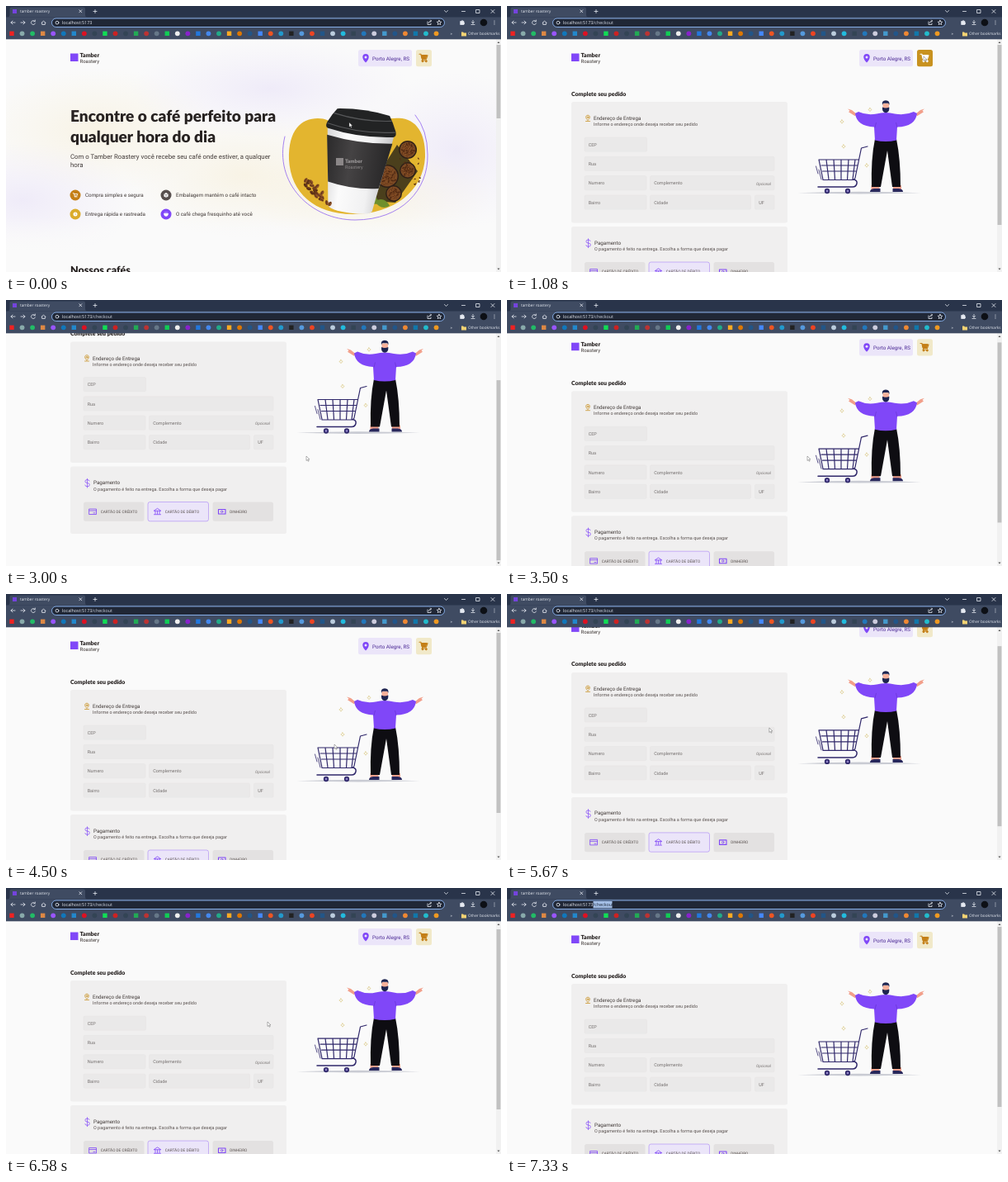
These frames come from a looping animation (600x322 px, 8000 ms). An HTML page:

```html
<!DOCTYPE html>
<html lang="pt-BR">
<head>
<meta charset="utf-8">
<title>tamber roastery</title>
<style>
html, body { margin: 0; width: 100%; height: 100%; overflow: hidden; background: #fafafa; }
svg { display: block; width: 100%; height: 100%; }
text { font-family: Roboto, sans-serif; font-size: 6.25px; fill: #403937; text-rendering: geometricPrecision; }
.title { font-family: Lato, sans-serif; font-weight: 900; fill: #272221; }
.hero { font-size: 19.1px; }
.lead { font-size: 7.8px; }
.ui { font-family: "Open Sans", sans-serif; font-size: 4.8px; fill: #e6eaf1; }
.small { font-size: 5.47px; fill: #574f4d; }
.hint { font-size: 5.47px; fill: #75706f; }
.opt { font-size: 4.69px; fill: #574f4d; }
.line { fill: none; stroke-linecap: round; stroke-linejoin: round; }
</style>
</head>
<body>
<svg viewBox="0 0 600 322">
  <defs>
    <clipPath id="view"><rect y="40" width="600" height="282"/></clipPath>
    <radialGradient id="cream"><stop stop-color="#f6ecd0" stop-opacity=".5"/><stop offset="1" stop-color="#f6eed6" stop-opacity="0"/></radialGradient>
    <radialGradient id="lilac"><stop stop-color="#e6dff7" stop-opacity=".55"/><stop offset="1" stop-color="#ece6fa" stop-opacity="0"/></radialGradient>
    <linearGradient id="paper"><stop stop-color="#d5d5d7"/><stop offset=".3" stop-color="#fbfbfb"/><stop offset=".7" stop-color="#f1f1f2"/><stop offset="1" stop-color="#c4c4c6"/></linearGradient>
    <linearGradient id="sleeve"><stop stop-color="#2b2a2b"/><stop offset=".4" stop-color="#454344"/><stop offset="1" stop-color="#272627"/></linearGradient>
    <linearGradient id="fade" x2="0" y2="1"><stop stop-color="#fafafa" stop-opacity="0"/><stop offset="1" stop-color="#fafafa"/></linearGradient>
    <path id="trolley" class="line" d="M-5 -4.2h2l1.6 6h4.8l1.6 -4.5h-7.2M-1.2 2l-.6 1.5h5.6"/>
  </defs>

  <g clip-path="url(#view)">
    <rect y="40" width="600" height="282" fill="#fafafa"/>
    <g id="page">
      <g id="home">
        <g id="glow"></g>
        <rect y="255" width="600" height="44" fill="url(#fade)"/>
        <rect y="298" width="600" height="24" fill="#fafafa"/>
        <text class="title hero" x="78" y="140.400">Encontre o café perfeito para</text>
        <text class="title hero" x="78" y="165">qualquer hora do dia</text>
        <text class="title" style="font-size:12.500px" x="78" y="324">Nossos cafés</text>
        <text class="lead" x="78" y="185">Com o Tamber Roastery você recebe seu café onde estiver, a qualquer</text>
        <text class="lead" x="78" y="194.500">hora</text>
        <g id="perks"></g>
        <path class="line" d="M338 158C324 215 370 259 423 259C480 259 512 222 511 180Q511 150 496 132" stroke="#8f63f0" stroke-width=".8"/>
        <path d="M343 186C342 150 358 136 378 136C396 136 402 150 422 150C446 150 452 133 480 136C501 139 509 160 508 183C506 224 470 252 420 252C374 252 345 226 343 186Z" fill="#e3b52f"/>
        <path d="M450 206L474 168L499 200L472 238L442 236Z" fill="#4b3f1c"/>
        <path d="M438 226q10 -1 14 13q-14 4 -14 -13M447 236q12 -6 18 6q-11 6 -18 -6" fill="#6f8f2c"/>
        <g id="bowls"></g>
        <g id="cup" transform="translate(425 188) rotate(8)">
          <path d="M-41 -38H41L27 57Q25 63 0 63Q-25 63 -27 57Z" fill="url(#paper)"/>
          <path d="M-40 -27Q0 -21 40 -27L31 29Q0 35 -31 29Z" fill="url(#sleeve)"/>
          <path d="M-37 -52L-32 -60Q0 -65 32 -60L37 -52L42 -42Q44 -36 40 -35Q0 -28 -40 -35Q-44 -36 -42 -42Z" fill="#222324"/>
          <path class="line" d="M-35 -54Q0 -48 35 -54M-41 -41Q0 -33 41 -41" stroke="#565759" stroke-width="1.200"/>
        </g>
        <rect x="400" y="184" width="9" height="9" fill="#8b8788"/>
        <text class="title" style="font-size:6.200px;fill:#9a9798" x="411" y="190">Tamber</text>
        <text style="font-size:5.500px;fill:#8b8788" x="411" y="197">Roastery</text>
        <g id="beans"></g>
      </g>

      <g id="checkout">
        <text class="title" style="font-size:7px" x="78" y="108.500">Complete seu pedido</text>
        <g fill="#f0efef">
          <rect x="78" y="116" width="262" height="146.500" rx="2.500"/>
          <rect x="78" y="267" width="262" height="81.500" rx="2.500"/>
        </g>
        <g class="line" stroke="#c9952b" stroke-width=".8">
          <path d="M98 138.500c-3 -2.500 -3.300 -6 0 -6.300c3.300 .3 3 3.800 0 6.300M95.500 139.500h5"/><circle cx="98" cy="134.800" r="1"/>
        </g>
        <text x="105" y="138">Endereço de Entrega</text>
        <text class="small" x="105" y="145">Informe o endereço onde deseja receber seu pedido</text>
        <g id="fields"></g>
        <text class="hint" style="font-size:4.690px;font-style:italic" x="302" y="216.500">Opcional</text>
        <path class="line" d="M101 284.500q-.3 -1.500 -2.500 -1.500q-2.600 0 -2.600 2t2.600 2q2.800 0 2.800 2.200t-2.800 2.100q-2.500 0 -2.700 -1.800M98.500 281.800v10.800" stroke="#8047f8" stroke-width=".7"/>
        <text x="106" y="288.500">Pagamento</text>
        <text class="small" x="106" y="296">O pagamento é feito na entrega. Escolha a forma que deseja pagar</text>
        <g id="options"></g>
        <g class="line" stroke="#8047f8" stroke-width=".8">
          <path d="M101 318.500h8.500v6.500h-8.500zM101 320.500h8.500M106 323.300h2"/>
          <path d="M179.500 320.500l4 -2.700l4 2.700zM181 321v3.500M183.500 321v3.500M186 321v3.500M179.500 325.200h8"/>
          <path d="M257.500 319h8.500v5.500h-8.500z" stroke-width="1.100"/><circle cx="261.700" cy="321.700" r="1.200"/>
        </g>

        <g id="shopper">
          <path d="M352 226.300Q427 223 502 226.300Q427 228.500 352 226.300Z" fill="#c9cbd3"/>
          <g class="line" stroke="#dccb8a" stroke-width=".7" id="sparks"></g>
          <path d="M441.500 217h10v6h-10zM468 217h10v6h-10z" fill="#f0a08c"/>
          <path d="M440 225q0 -3.500 5 -4h7.500v4zM480 225q0 -3.500 -5 -4h-7.500v4z" fill="#28285c"/>
          <path d="M446 161h26q5 24 5 58h-10l-6 -44l-8 44h-11q-1 -34 4 -58" fill="#0e0d12"/>
          <path d="M424 131l-6 -5l-5 -1.500l2.500 2.300l-1.500 1.500l8 5zM495 131l6 -5l5 -1.500l-2.500 2.300l1.500 1.500l-8 5z" fill="#f29f8a"/>
          <path d="M422 130l4 -2q11 5 22 2.500q11 -3 22 0q12 2.500 23 -2.500l4 2q-2 16 -24 16.500l-1 16q-13 3 -26 0l-1 -16q-21 -1 -23 -16.500" fill="#8047f8"/>
          <path d="M446 147l1.500 -6M473 147l-1.500 -6" stroke="#6330cc" stroke-width=".6"/>
          <path d="M455.500 118h7.500v8h-7.500z" fill="#f7b19a"/>
          <path d="M455 120q-1.200 -5.500 4 -5.700q5.500 .2 4.300 5.700l-1 -2.200h-6.300zM455 122.500q4 2 8.300 0v2q0 4 -4.200 4.700q-4.100 -.7 -4.100 -4.700z" fill="#1d2450"/>
          <g class="line" stroke="#30286b">
            <path d="M437 170l-7.500 2l-7.500 36q-.5 2.500 -3 2.500h-36M378 186h48M378 186l5 24M381 193h44M382.500 200h40.500M387 186l3 24M396 186l1.500 24M405 186v24M414 186l-1.500 24M422 186l-3 24" stroke-width="1.200"/>
            <path d="M420 210q5 1 4 5t-5 4h-42" stroke-width="1.500"/>
            <path d="M374.500 194l2.500 9M378 198l3 12" stroke-width=".8"/>
          </g>
          <g fill="#8c80c4" stroke="#30286b" stroke-width="1.700"><circle cx="388" cy="224" r="2.300"/><circle cx="413" cy="224" r="2.300"/></g>
        </g>
      </g>

      <rect x="78" y="57.500" width="9.500" height="9.500" fill="#8047f8"/>
      <text class="title" style="font-size:7px" x="89.500" y="61.800">Tamber</text>
      <text style="font-size:6px" x="89.500" y="69.300">Roastery</text>
      <rect x="427" y="53" width="65" height="20.300" rx="2.500" fill="#ebe5f9"/>
      <path d="M436 68.500c-5 -4.500 -5 -10.300 0 -10.500c5 .2 5 6 0 10.500" fill="#8047f8"/><circle cx="436" cy="62" r="1.500" fill="#ebe5f9"/>
      <text x="444" y="65.700" style="fill:#4b2995">Porto Alegre, RS</text>
      <rect id="cartBox" x="497" y="53" width="19" height="20.300" rx="2.500"/>
      <g id="cart" transform="translate(506 62.500)"><path d="M-3 -3h7l-1.500 4.500h-4.300z"/><use href="#trolley" stroke-width="1.100"/><circle cx="-1" cy="4.300" r="1"/><circle cx="3.300" cy="4.300" r="1"/></g>
    </g>
    <rect x="594" y="40" width="6" height="282" fill="#f1f1f1"/>
    <rect id="thumb" x="594.600" width="4.800" fill="#c1c1c1"/>
    <path d="M595.500 45l1.500 -2l1.500 2zM595.500 317.500l1.500 2l1.500 -2z" fill="#555"/>
  </g>

  <g id="browser">
    <rect width="600" height="40.300" fill="#3f4b62"/>
    <rect width="600" height="13.500" fill="#29344a"/>
    <path d="M2 13.500q2.500 0 2.500 -3v-7q0 -2 2 -2h87.500q2 0 2 2v7q0 3 2.500 3z" fill="#3f4b62"/>
    <rect x="8" y="4" width="5" height="5" fill="#7444dd"/>
    <text class="ui" x="17" y="8.400">tamber roastery</text>
    <rect x="55.500" y="15" width="476" height="10.500" rx="5.250" fill="#202736" stroke="#86aee8" stroke-width="1"/>
    <rect id="selection" x="104.500" y="16" width="23" height="8.300" fill="#a4bfe6"/>
    <text class="ui" style="font-size:5.400px" x="68" y="22.200">localhost:5173<tspan id="path">/checkout</tspan></text>
    <g class="line" stroke="#e6eaf1" stroke-width=".8">
      <path d="M88.800 4.800l3 3m0 -3l-3 3M106 6.500h4m-2 -2v4M531.500 5.500l2 2l2 -2M552.500 6.500h4M570 4.500h4v4h-4zM588 4.500l4 4m0 -4l-4 4"/>
      <path d="M11 20h-5m2 -2l-2 2l2 2M18 20h5m-2 -2l2 2l-2 2M35 18.500a2.500 2.500 0 1 0 .4 2.500M35.300 17v1.700h-1.700M43 20.500l2.500 -2.500l2.500 2.500M43.700 20v2.500h3.600v-2.500"/>
      <path d="M511 19v3.500h4v-1.500M512.500 20.500q0 -2.500 3 -2.500m-1 -1l1 1l-1 1M525 17.300l.8 1.800l2 .2l-1.500 1.300l.4 2l-1.700 -1l-1.700 1l.4 -2l-1.500 -1.300l2 -.2z"/>
      <path d="M551 18.500h4v4h-4zM552.500 17.800h1.200M555.500 20.500v1" fill="#e6eaf1"/>
      <path d="M566 17.500v3.500m-1.500 -1.500l1.500 1.500l1.500 -1.500M564 22.500h4"/>
      <circle cx="62" cy="20.200" r="1.900"/>
    </g>
    <path d="M552 31.500h2l1 1h3v4h-6z" fill="#f5d373"/>
    <circle cx="579" cy="20" r="4.300" fill="#0d1016"/>
    <g fill="#e6eaf1"><circle cx="592" cy="18" r=".6"/><circle cx="592" cy="20" r=".6"/><circle cx="592" cy="22" r=".6"/></g>
    <g id="bookmarks"></g>
    <text class="ui" x="538.500" y="34.800">»</text>
    <text class="ui" style="font-size:4.700px" x="560" y="35">Other bookmarks</text>
  </g>
  <path id="cursor" d="M0 0v5.500l1.300 -1.200l1 2l.9 -.4l-.9 -2h1.700z" fill="#fff" stroke="#444" stroke-width=".4"/>
</svg>

<script>
const $ = id => document.getElementById(id);
const fill = (id, items, draw) => { $(id).innerHTML = items.map(draw).join(''); };

let seed = 7;
const random = () => (seed = seed * 16807 % 2147483647) / 2147483647;

fill('bookmarks', ('e22 8aa 2b6 d84 95f 17b 28c d12 345 1d5 c22 345 2a5 b33 678 1c5 eee 82c 27d ' +
  '48e 2a8 fa2 d70 258 48f e52 29c 222 59d e42 258 bcd 2bd 345 27b ccd 49c 258 e83 17a 2bc e92').split(' '),
  (c, i) => i % 3
    ? `<circle cx="${7 + i * 12.55}" cy="33.300" r="2.900" fill="#${c}"/>`
    : `<rect x="${4.3 + i * 12.55}" y="30.600" width="5.400" height="5.400" fill="#${c}"/>`);

fill('glow', [['cream', 110, 150, 150, 75], ['lilac', 320, 100, 170, 60], ['cream', 290, 205, 150, 75],
  ['lilac', 20, 235, 140, 70], ['lilac', 545, 175, 120, 95], ['cream', 440, 230, 150, 60]],
  ([name, x, y, rx, ry]) => `<ellipse cx="${x}" cy="${y}" rx="${rx}" ry="${ry}" fill="url(#${name})"/>`);

fill('perks', [
  [84, 229, '#c47f17', 'Compra simples e segura', '<use href="#trolley" transform="scale(.55)" stroke="#fff" stroke-width="1.500"/>'],
  [194, 229, '#574f4d', 'Embalagem mantém o café intacto', '<path d="M0 -3l2.600 1.400v3.200l-2.600 1.400l-2.600 -1.400v-3.200z" fill="#fff"/><path d="M-2.600 -1.600l2.600 1.400l2.600 -1.400M0 0v3" stroke="#574f4d" stroke-width=".5" fill="none"/>'],
  [84, 252, '#dbac2c', 'Entrega rápida e rastreada', '<circle r="2.500" fill="#fff"/><path d="M0 -1.500v1.500l1 1" stroke="#dbac2c" stroke-width=".6" fill="none"/>'],
  [194, 252, '#8047f8', 'O café chega fresquinho até você', '<path d="M-2.600 -1h5.200q0 3.500 -2.600 3.500t-2.600 -3.500M-1 -3v1M1 -3v1" fill="#fff" stroke="#fff" stroke-width=".5"/>']
], ([x, y, color, label, icon]) => `<g transform="translate(${x} ${y})"><circle r="6.500" fill="${color}"/>
  ${icon}<text x="12" y="2.200">${label}</text></g>`);

const bean = (x, y, size) => `<g transform="translate(${x} ${y}) rotate(${random() * 180})">
  <ellipse rx="${size}" ry="${size * .68}" fill="${random() < .5 ? '#6b3a1b' : '#8c5127'}"/>
  <path d="M${-size} 0q${size} ${size * .5} ${size * 2} 0" fill="none" stroke="#32180b" stroke-width=".5"/></g>`;

fill('bowls', [[487, 174, 11, 24], [487, 199, 10, 18], [462, 206, 14, 30], [470, 227, 10, 16]], ([x, y, r, count]) => {
  let out = `<circle cx="${x}" cy="${y}" r="${r}" fill="#2f2018"/><circle cx="${x}" cy="${y}" r="${r - 1.5}" fill="#7b4a24"/>`;
  for (let i = 0; i < count; i++) {
    const angle = i * 2.4, d = (r - 3) * Math.sqrt(i / count);
    out += bean(x + d * Math.cos(angle), y + d * Math.sin(angle), 1.8);
  }
  return out;
});
fill('beans', Array.from({ length: 38 }), (_, i) => i < 22
  ? bean(356 + i * 1.1 + random() * 14, 209 + i * 1.3 + random() * 4, 2.9)
  : bean(478 + random() * 25, 180 + random() * 40, 1.1));

fill('fields', [['CEP', 94, 159, 75.5], ['Rua', 94, 182.3, 230], ['Numero', 94, 205.6, 75], ['Complemento', 173.5, 205.6, 150.5],
  ['Bairro', 94, 229, 75], ['Cidade', 173.5, 229, 122], ['UF', 300.5, 229, 23.5]],
  ([label, x, y, w]) => `<rect x="${x}" y="${y}" width="${w}" height="17.200" rx="1.500" fill="#eae9e9" stroke="#e4e2e2" stroke-width=".5"/>
    <text class="hint" x="${x + 4.7}" y="${y + 10.8}">${label}</text>`);

fill('options', [['CARTÃO DE CRÉDITO', 94], ['CARTÃO DE DÉBITO', 172], ['DINHEIRO', 250.5]],
  ([label, x], i) => `<rect x="${x}" y="310" width="73.500" height="23.300" rx="2.500"
    fill="${i === 1 ? '#ebe5f9' : '#e3e1e1'}" stroke="${i === 1 ? '#9a70f5' : 'none'}" stroke-width=".5"/>
    <text class="opt" x="${x + 20.7}" y="323.400">${label}</text>`);

fill('sparks', [[440, 125.5], [406, 140], [408, 170], [436, 193]],
  ([x, y]) => `<path d="M${x} ${y - 2.2}l.8 1.400l1.400 .8l-1.400 .8l-.8 1.400l-.8 -1.400l-1.400 -.8l1.400 -.8z"/>`);

const LOOP = 8000, STEP = 1000 / 12, BOTTOM = 65.5;
const OPEN_CHECKOUT = 1080, SELECT_PATH = 7325;

const pointer = [[0, 417, 142], [250, 440, 72], [417, 490, 62], [500, 506, 62], [1917, 506, 62], [2000, 427, 154],
  [2500, 365, 190], [3583, 365, 190], [4500, 399, 183], [5583, 319, 163], [6167, 318, 163], [6750, 318, 163], [7167, 128, 20], [LOOP, 128, 20]];

function pointerAt(t) {
  const i = Math.max(1, pointer.findIndex(key => key[0] >= t));
  const [t0, x0, y0] = pointer[i - 1], [t1, x1, y1] = pointer[i];
  const k = (t - t0) / (t1 - t0);
  return [x0 + (x1 - x0) * k, y0 + (y1 - y0) * k];
}

function glide(t, start, end) {
  const k = Math.min(1, Math.max(0, (t - start) / (end - start)));
  return 1 - (1 - k) ** 1.35;
}

const scrollAt = t => BOTTOM * (glide(t, 2583, 2833) - glide(t, 3083, 3583) + glide(t, 5583, 5917) - glide(t, 6000, 6667));
const show = (id, on) => $(id).setAttribute('visibility', on ? 'visible' : 'hidden');

function render(now) {
  const t = Math.floor((now % LOOP + 4) / STEP) * STEP % LOOP;
  const checkout = t >= OPEN_CHECKOUT, selected = t >= SELECT_PATH;
  const hover = t >= 495 && t < 2080;
  const scroll = scrollAt(t);

  show('home', !checkout);
  show('checkout', checkout);
  show('path', checkout);
  show('selection', selected);
  $('path').style.fill = selected ? '#1b2536' : '#ccd3de';
  $('page').setAttribute('transform', `translate(0 ${-scroll})`);
  $('thumb').setAttribute('y', 47 + scroll * .765);
  $('thumb').setAttribute('height', checkout ? 218 : 89);

  $('cartBox').setAttribute('fill', hover ? '#c8921f' : '#f1e9c9');
  $('cart').setAttribute('fill', hover ? '#fff' : '#c47f17');
  $('cart').setAttribute('stroke', hover ? '#fff' : '#c47f17');

  show('cursor', t < 7160);
  $('cursor').setAttribute('transform', `translate(${pointerAt(t).map(v => v - 1)})`);
}

const start = performance.now();
(function tick() {
  render(performance.now() - start);
  requestAnimationFrame(tick);
})();
</script>
</body>
</html>
```
